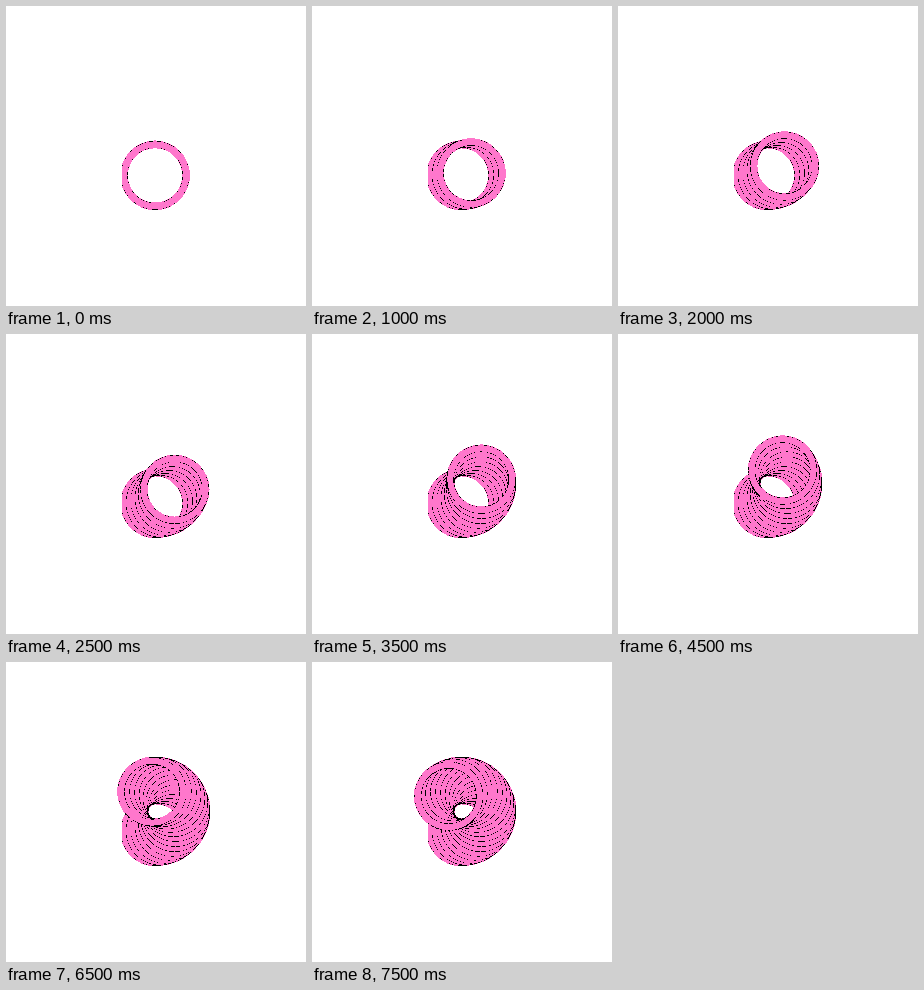
An HTML page with a canvas that plays this animation: 300x300 px, repeating every 8000 ms.

```html
<!DOCTYPE html>
<html lang="en">
<head>
<meta charset="utf-8">
<title>Circling rings</title>
<style>
  html, body { margin: 0; width: 100%; height: 100%; overflow: hidden; background: #fff; }
  canvas { display: block; width: 300px; height: 300px; image-rendering: pixelated; }
</style>
</head>
<body>
<canvas id="stage" width="300" height="300"></canvas>
<script>
const ctx = document.getElementById('stage').getContext('2d', { willReadFrequently: true });
const SIZE = 300, LOOP = 8000, STEP = 500;
const CENTER = { x: 149.6, y: 149.4 }, ORBIT = 20;
const OUTER = 34.3, INNER = 27.7;
const RAD = Math.PI / 180;
const WHITE = [255, 255, 255], PINK = [255, 119, 204], BLACK = [0, 0, 0];
const PALETTE = [WHITE, PINK, BLACK];

const css = c => `rgb(${c})`;

function circle(x, y, r) {
  ctx.moveTo(x + r, y);
  ctx.arc(x, y, r, 0, Math.PI * 2);
}

function ring(i) {
  const a = (14.75 * i - 1.5) * RAD;
  const x = CENTER.x + ORBIT * Math.sin(a);
  const y = CENTER.y + ORBIT * Math.cos(a);
  ctx.beginPath();
  circle(x, y, OUTER);
  circle(x, y, INNER);
  ctx.fill('evenodd');
  ctx.stroke();
}

// Snap every pixel to the nearest flat colour, which breaks the thin outlines
function flatten() {
  const img = ctx.getImageData(0, 0, SIZE, SIZE), px = img.data;
  for (let i = 0; i < px.length; i += 4) {
    let best = WHITE, least = Infinity;
    for (const c of PALETTE) {
      const d = (px[i] - c[0]) ** 2 + (px[i + 1] - c[1]) ** 2 + (px[i + 2] - c[2]) ** 2;
      if (d < least) { least = d; best = c; }
    }
    px.set(best, i);
  }
  ctx.putImageData(img, 0, 0);
}

function draw(count) {
  ctx.fillStyle = css(WHITE);
  ctx.fillRect(0, 0, SIZE, SIZE);
  ctx.fillStyle = css(PINK);
  ctx.strokeStyle = css(BLACK);
  ctx.lineWidth = 0.65;
  // The first ring is cut flat on its left side
  ctx.save();
  ctx.beginPath();
  ctx.rect(116, 0, SIZE, SIZE);
  ctx.clip();
  ring(0);
  ctx.restore();
  for (let i = 1; i < count; i++) ring(i);
  flatten();
}

let shown = 0;
function tick() {
  const count = Math.floor((performance.now() % LOOP) / STEP) + 1;
  if (count !== shown) draw(shown = count);
  requestAnimationFrame(tick);
}
tick();
</script>
</body>
</html>
```
